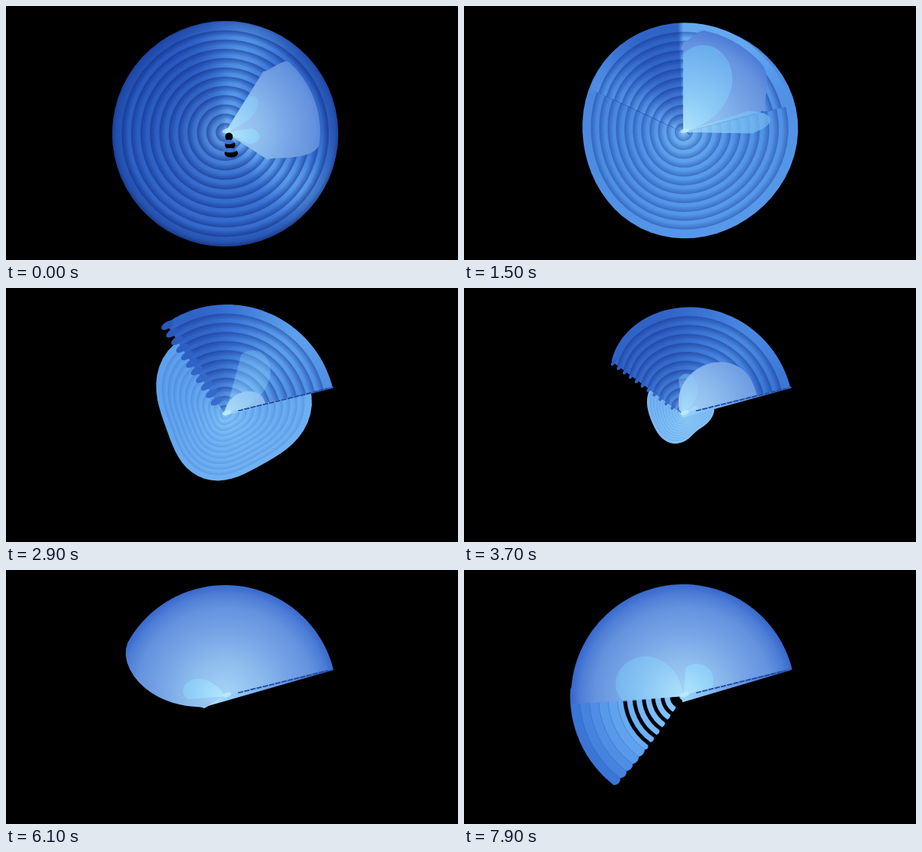
An HTML page with a canvas that plays this animation: 600x338 px, repeating every 8 s.

```html
<!DOCTYPE html>
<html lang="en">
<head>
<meta charset="utf-8">
<title>Unfolding shell</title>
<style>
html, body { margin: 0; width: 100%; height: 100%; overflow: hidden; background: #000; }
canvas { display: block; width: 600px; height: 338px; }
</style>
</head>
<body>
<canvas id="stage" width="600" height="338"></canvas>
<script>
const ctx = document.getElementById('stage').getContext('2d');
const CX = 291, CY = 168, LOOP = 8000, STEP = 100, RINGS = 12, EDGE = 346;
const RAD = Math.PI / 180;

const mix = (a, b, u) => a + (b - a) * u;
const clamp = v => Math.max(0, Math.min(1, v));
const smooth = v => { const x = clamp(v); return x * x * (3 - 2 * x); };
const cosd = deg => Math.cos(deg * RAD);
const bump = (deg, width) => Math.exp(-((deg / width) ** 2));

// Value at time t along time, value, time, value, ...
function key(t, ...k) {
  let i = 0;
  while (i < k.length - 4 && t >= k[i + 2]) i += 2;
  return mix(k[i + 1], k[i + 3], clamp((t - k[i]) / (k[i + 2] - k[i])));
}

// Angles are in degrees, clockwise from the right.
function polar(deg, r) {
  return [CX + r * cosd(deg), CY + r * Math.sin(deg * RAD)];
}

function outline(a0, a1, radius) {
  const parts = 60, pts = [];
  for (let s = 0; s <= parts; s++) {
    const deg = mix(a0, a1, s / parts);
    pts.push(polar(deg, radius(deg, s / parts)));
  }
  if (a1 - a0 < 360) pts.push([CX, CY]);
  return pts;
}

function trace(pts, scale = 1) {
  pts.forEach(([x, y], i) => {
    const px = mix(CX, x, scale), py = mix(CY, y, scale);
    i ? ctx.lineTo(px, py) : ctx.moveTo(px, py);
  });
  ctx.closePath();
}

function fill(pts, style, alpha = 1) {
  ctx.globalAlpha = alpha;
  ctx.beginPath();
  trace(pts);
  ctx.fillStyle = style;
  ctx.fill();
  ctx.globalAlpha = 1;
}

function oval(x, y, rx, ry, style, turn = 0) {
  ctx.beginPath();
  ctx.ellipse(x, y, rx, ry, turn, 0, 7);
  ctx.fillStyle = style;
  ctx.fill();
}

function radial(radius, ...stops) {
  const g = ctx.createRadialGradient(CX, CY, 0, CX, CY, radius);
  stops.forEach(([p, c]) => g.addColorStop(p, c));
  return g;
}

const RAMP = [[16, 42, 118], [38, 84, 186], [66, 126, 220], [98, 166, 240], [146, 206, 250], [176, 228, 255]];

function shade(light) {
  const x = clamp(light) * 4.999, i = Math.floor(x);
  return `rgb(${RAMP[i].map((v, j) => Math.round(mix(v, RAMP[i + 1][j], x - i))).join()})`;
}

function conic(light) {
  const g = ctx.createConicGradient(0, CX, CY);
  for (let deg = 0; deg <= 360; deg += 3) g.addColorStop(deg / 360, shade(light(deg)));
  return g;
}

function band(pts, from, to, style) {
  ctx.beginPath();
  trace(pts, from);
  trace(pts, to);
  ctx.fillStyle = style;
  ctx.fill('evenodd');
}

// A surface made of nested rings, each darker at its outer edge.
function ringed(pts, light, depth) {
  fill(pts, conic(light));
  fill(pts, radial(150, [0, 'rgba(150,215,255,.5)'], [.35, 'rgba(110,180,250,.15)'], [.7, 'rgba(60,120,220,0)']));
  for (let k = RINGS - 1; k > 0; k--) {
    for (let s = 0; s < 5; s++) {
      band(pts, (k - s * .12) / RINGS, (k - s * .12 - .12) / RINGS, `rgba(12,42,130,${depth * (1 - s / 5)})`);
    }
  }
}

const baseTone = t => key(t, 0, .27, 600, .36, 1500, .48, 2900, .62, 4500, .8);

function drawBase(t) {
  const mean = key(t, 0, 150, 900, 149, 1500, 143, 2900, 99, 3600, 48, 4500, 0);
  const lean = key(t, 0, 2, 1500, 8, 2900, 17, 3600, 5, 4500, 51, 5700, 0);
  const turn = key(t, 0, 270, 1500, 160, 2900, 115, 4500, -10);
  const wave = key(t, 1000, 0, 2900, 8, 4500, 0);
  const pts = outline(0, 360, deg =>
    Math.max(5, mean - lean * cosd(deg - turn) + wave * cosd(3 * (deg - 110))));
  const early = key(t, 0, 1, 600, .5, 1500, 0);
  const light = deg => baseTone(t) + .05 * cosd(deg - 60)
    + early * (.26 * bump(deg - 283, 24) + .22 * bump(deg - 35, 20));
  ringed(pts, light, key(t, 0, .5, 1500, .36, 2900, .13));
  fill(pts, radial(153, [.84, 'rgba(14,44,130,0)'], [.95, 'rgba(14,44,130,.35)'], [1, 'rgba(10,30,96,.7)']),
    key(t, 0, 1, 600, .6, 1500, 0));
}

function drawFan(t) {
  const start = key(t, 0, 195, 1500, 205, 2900, 237, 4500, 196, 6100, 186);
  const dent = key(t, 1500, .08, 2900, .02, 4500, .37, 6100, .3);
  const radius = deg => 147 * (1 - dent * Math.exp((start - deg) / 30));
  const seam = key(t, 1500, 267, 2900, 250);
  const soft = key(t, 1500, 2, 2900, 75);
  const lift = key(t, 1500, .34, 2900, .34, 4500, .08);
  const blend = key(t, 1500, 1, 2900, 0);
  const light = deg => {
    const dark = mix(.27, baseTone(t), blend * (1 - smooth((deg - start) / 45)));
    return dark + lift * smooth((deg - seam) / soft) - .12 * smooth((deg - 300) / 46);
  };
  ctx.save();
  if (t < 1500) ctx.globalAlpha = 0;
  ringed(outline(start, EDGE, radius), light, .42);
  const tip = key(t, 1900, 0, 2900, 1, 4500, 0);
  for (let k = RINGS; k > 1 && tip > .1; k--) {
    const [x, y] = polar(start, radius(start) * k / RINGS - 3);
    oval(x, y, 9 * tip, 4.6 * tip, shade(mix(.34, .22, k / RINGS)), (start + 90) * RAD);
  }
  ctx.restore();
}

// Separate ring ends that sweep out below the sheet.
function drawCrescents(t) {
  const grow = clamp((t - 6100) / 1800);
  if (!grow) return;
  const from = 184 * RAD;
  for (let k = RINGS; k > 1; k--) {
    const r = 150 * k / RINGS, w = k > 7 ? 14 : 7.5;
    const to = mix(182, 128, grow) - (RINGS - k) * .45;
    ctx.beginPath();
    ctx.arc(CX, CY, r, from, to * RAD, true);
    ctx.quadraticCurveTo(...polar(to - 3 * grow, r - w / 2), ...polar(to, r - w));
    ctx.arc(CX, CY, r - w, to * RAD, from);
    ctx.closePath();
    ctx.fillStyle = shade(mix(.76, .36, (k / RINGS) ** 2));
    ctx.fill();
    ctx.strokeStyle = 'rgba(24,72,170,.3)';
    ctx.stroke();
  }
}

function drawSheet(t) {
  const start = key(t, 0, 302, 1500, 270, 2900, 260, 4500, 200, 6100, 150, 7900, 176);
  const end = key(t, 0, 393, 600, 378, 1500, 345, 2900, EDGE);
  const size = key(t, 0, 126, 600, 137, 1500, 138, 2900, 55, 4500, 147, 7900, 149);
  const low = key(t, 0, .76, 1500, .87, 2900, .08, 4500, .1, 6100, .22, 7900, 1);
  const rise = key(t, 0, 10, 1500, 12, 2900, 80, 4500, 125, 6100, 60);
  const drop = key(t, 0, .54, 600, .72, 1500, .82, 2900, 1);
  const pts = outline(start, end, deg => size
    * mix(low, 1, smooth((deg - start) / rise)) * mix(drop, 1, smooth((end - deg) / 26)));
  fill(pts, radial(152, [0, '#a6d4f6'], [.3, '#8fbeee'], [.55, '#78a5e6'],
    [.78, '#6492de'], [.9, '#4d7dd6'], [1, '#3262c8']));
}

function drawGlows(t) {
  const glow = radial(125, [0, '#b4e8ff'], [.4, '#8ccef8'], [1, '#68b0f0']);
  const reach = key(t, 0, 60, 600, 100, 1500, 122, 2900, 95, 4500, 8, 6100, 54, 7900, 92);
  const upper = outline(
    key(t, 0, 302, 1500, 270, 2900, 285, 4500, 240, 6100, 175),
    key(t, 0, 340, 2900, EDGE, 6100, 235, 7900, 262),
    (deg, u) => reach * (1 - u ** 2.5) * (1 - .2 * (1 - u) ** 6) + 6);
  fill(upper, glow, key(t, 0, .6, 600, .85, 1500, .8, 2900, .4, 4500, .4, 6100, .9, 7900, .7));

  const spread = key(t, 0, 46, 600, 83, 1500, 117, 2900, 35, 4500, 8, 6100, 6, 7900, 50);
  const lower = outline(
    key(t, 0, 352, 600, 343, 2900, 340, 6100, 275),
    key(t, 0, 386, 600, 377, 1500, 361, 2900, EDGE),
    (deg, u) => spread * (.78 + .22 * Math.sin(Math.PI * u)));
  fill(lower, glow, key(t, 0, .9, 2900, .6, 6100, .7, 7900, .9));
}

function drawStrip(t) {
  const corner = [key(t, 4500, 290, 6100, 268, 7900, 290), key(t, 2900, 170, 6100, 181, 7900, 176)];
  const g = ctx.createLinearGradient(280, 0, 435, 0);
  g.addColorStop(0, '#a4dcfa');
  g.addColorStop(.4, '#79aeee');
  g.addColorStop(1, '#2f60c4');
  const alpha = key(t, 1500, 0, 2900, 1);
  fill([[288, 167], [434, 131], [435, 133], corner], g, alpha);
  ctx.globalAlpha = alpha;
  ctx.beginPath();
  ctx.moveTo(308, 163.5);
  ctx.lineTo(427, 134);
  ctx.strokeStyle = '#1d4a9c';
  ctx.lineWidth = 1.8;
  ctx.setLineDash([7, 1.5]);
  ctx.stroke();
  ctx.setLineDash([]);
  ctx.lineWidth = 1;
  ctx.globalAlpha = 1;
}

function drawCentre(t) {
  const open = key(t, 0, 1, 600, .45, 1700, 0);
  for (let i = 0; i < 3 && open; i++) {
    const x = 296 + 1.5 * i, y = 168 + (6 + 11 * i) * open;
    oval(x, y, (5 + 2 * i) * open, 5.5 * open, '#000');
    if (i) oval(x - 2 * open, y - 4 * open, (5 + 2 * i) * open, 3 * open, '#3c74d0');
  }
  oval(293, 166, 6, 3, 'rgba(190,236,255,.8)', -.3);
}

function draw(t) {
  ctx.fillStyle = '#000';
  ctx.fillRect(0, 0, 600, 338);
  drawBase(t);
  if (t >= 1200) drawFan(Math.max(t, 1500));
  drawCrescents(t);
  drawSheet(t);
  drawGlows(t);
  drawStrip(t);
  drawCentre(t);
}

function frame() {
  const t = performance.now() % LOOP;
  draw(Math.floor(t / STEP) * STEP);
  requestAnimationFrame(frame);
}
frame();
</script>
</body>
</html>
```
